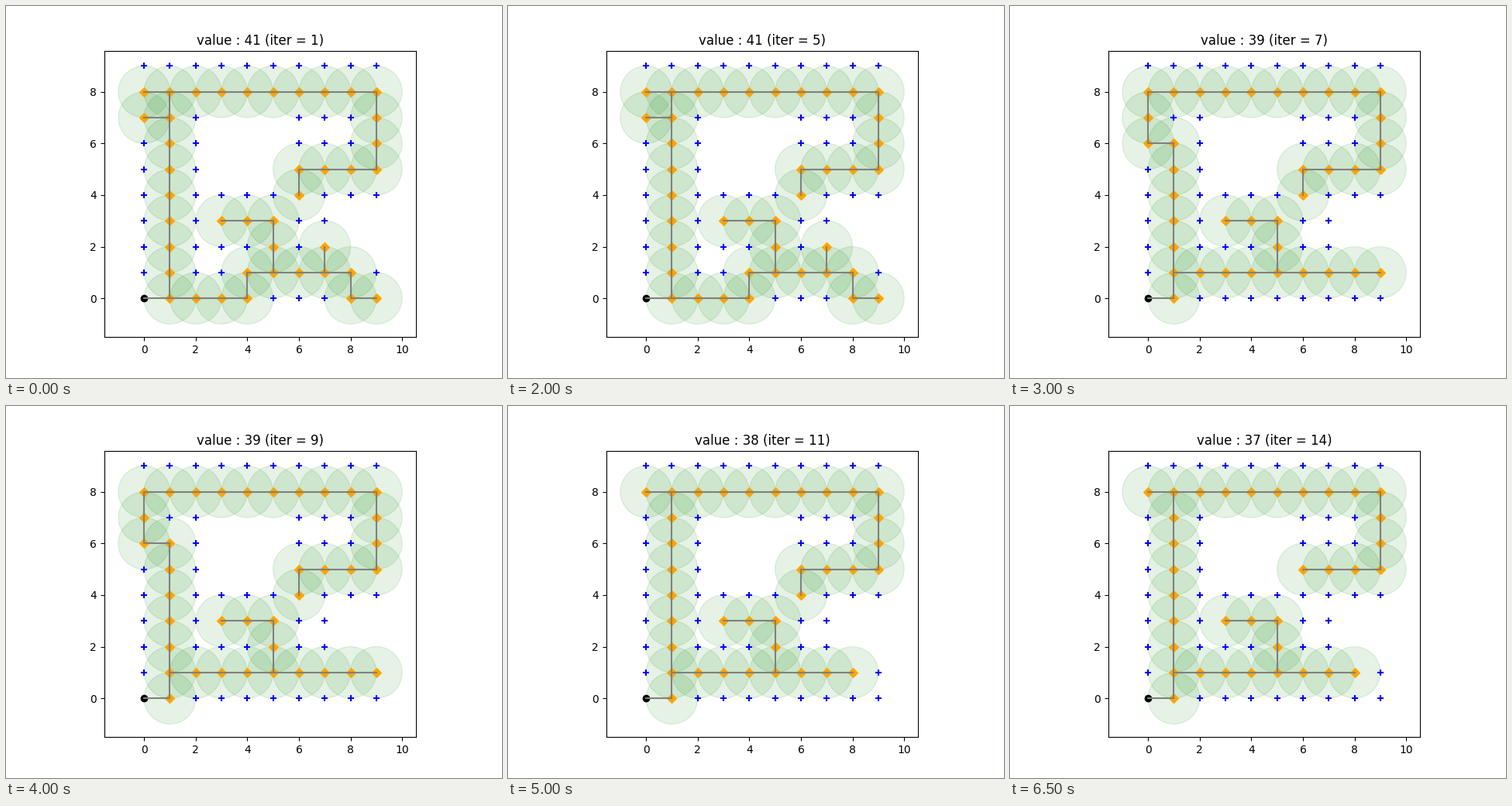
A matplotlib script that plays this animation: 640 px wide and 480 px high, repeating every 8500 ms.

```python
import matplotlib.pyplot as plt
from matplotlib.animation import FuncAnimation
from matplotlib.patches import Circle

SIZE = 10
STEPS = 14
HOLD = 3
MARGIN = 0.05
MOVES = {"E": (1, 0), "W": (-1, 0), "N": (0, 1), "S": (0, -1)}


def in_room(x, y):
    """Two rooms of the grid are walled off."""
    return (3 <= x <= 5 and 5 <= y <= 7) or (x >= 8 and 2 <= y <= 3)


GRID = [(x, y) for x in range(SIZE) for y in range(SIZE) if not in_room(x, y)]


def walk(x, y, moves):
    """Edges of a path that starts at (x, y) and takes one cell per move."""
    edges = []
    for move in moves:
        dx, dy = MOVES[move]
        edges.append(((x, y), (x + dx, y + dy)))
        x, y = x + dx, y + dy
    return edges


def tree(step):
    """Edges of the tree, which gets shorter as the search goes on."""
    edges = walk(0, 0, "E")
    edges += walk(0, 8, "E" * 9 + "SSSWWW" + "S" * (step < 12))
    edges += walk(5, 1, "NNWW")

    # Left wall, with a bend for a while
    bent = 6 <= step < 10
    edges += walk(1, 0, "N" * 6 + ("WNN" if bent else "NN"))

    # Floor, first along the bottom row
    edges += walk(1, 0, "EEENEEEE") if step < 7 else walk(1, 1, "E" * 7)
    if step < 6:
        edges += walk(8, 1, "SE") + walk(7, 1, "N") + walk(1, 7, "W")
    elif bent:
        edges += walk(8, 1, "E")
    return edges


def value(step):
    return 41 - sum(step >= gain for gain in (6, 7, 10, 12))


def padded(low, high):
    pad = MARGIN * (high - low)
    return low - pad, high + pad


fig, ax = plt.subplots(figsize=(6.4, 4.8), dpi=100)


def draw(frame):
    step = min(frame + 1, STEPS)
    edges = tree(step)
    nodes = sorted({p for edge in edges for p in edge} - {(0, 0)})
    free = [p for p in GRID if p not in nodes and p != (0, 0)]

    ax.clear()
    ax.set_aspect("equal")
    for node in nodes:
        ax.add_patch(Circle(node, 1, color="g", alpha=0.1))
    ax.scatter(*zip(*free), marker="+", color="blue")
    ax.scatter(*zip(*nodes), marker="D", color="orange")
    ax.scatter(0, 0, marker="o", color="black")
    for edge in edges:
        ax.plot(*zip(*edge), color="gray")

    # The top row's markers reach a little above y = 9
    ax.set_xlim(padded(-1, SIZE))
    ax.set_ylim(padded(-1, SIZE - 0.9084))
    ax.set_xticks(range(0, SIZE + 1, 2))
    ax.set_yticks(range(0, SIZE, 2))
    ax.set_title(f"value : {value(step)} (iter = {step})", pad=5.28)


anim = FuncAnimation(fig, draw, frames=STEPS + HOLD, init_func=lambda: None,
                     interval=500, repeat=True, repeat_delay=0)
plt.show()
```
